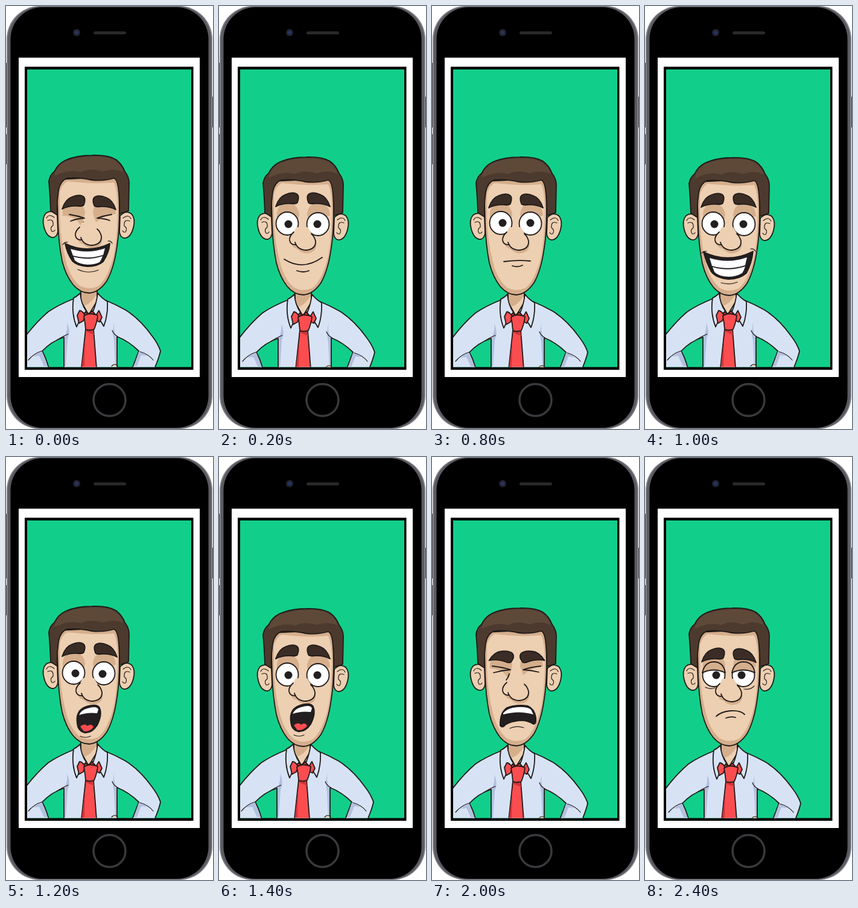
An HTML page for the animation above (2.6 s loop, 343 by 700 pixels).

```html
<!DOCTYPE html>
<html lang="en">
<head>
<meta charset="utf-8">
<title>Changing moods</title>
<style>
html, body { margin: 0; width: 100%; height: 100%; overflow: hidden; background: #fff; }
svg { display: block; width: 343px; height: 700px; }
.ink { stroke: #1f1a18; stroke-width: 1.8; stroke-linejoin: round; stroke-linecap: round; }
.line { fill: none; }
.thin { stroke-width: 1.2; }
.skin { fill: #edcfb1; }
.shade { fill: #d5ae8c; }
.shirt { fill: #d7e3f5; }
.fold { fill: #b3c0df; }
.red { fill: #fb4d50; }
.dark { fill: #cf3539; }
.hair { fill: #4d3a2e; }
.brow { fill: #3b2d26; }
.hole { fill: #231f20; }
.white { fill: #fff; }
</style>
</head>
<body>
<svg viewBox="0 0 343 700">
  <defs>
    <clipPath id="screen"><path d="M35 105H307V597.500H35Z"/></clipPath>

    <g id="body">
      <path class="ink shirt" d="M115 486Q88 497 72 508Q53 524 33 550V602H73Q69 586 62 573Q77 557 98 550V602H186V549Q206 557 222 573Q217 586 211 602H248Q255 586 258 573Q254 561 244 548Q224 520 200 505Q184 496 167 489Z"/>
      <path class="fold" d="M47 582Q54 576 62 574L71 598H65L57 581ZM236 581Q230 576 222 574L214 598H219L226 580ZM99 551Q105 535 103 525Q110 540 104 553L101 598H99ZM185 550Q179 538 182 523Q177 540 181 556L183 598H185Z"/>
      <path class="ink line thin" d="M39 588Q48 577 61 573M224 574Q238 578 246 588M86 555Q97 548 105 545M187 549Q180 545 178 539"/>
      <path class="ink skin thin" d="M177 598Q182 592 187 598"/>
      <path class="ink skin" d="M126 470V490L139 513L153 490V470Z"/>
      <path class="shade" d="M127 472V489L132 498Q143 494 152 480V472Z"/>
      <path class="ink dark" d="M124 505L119 516L124 526L134 518L139 512L152 519L161 524L160 511L153 501L139 511Z"/>
      <path class="ink shirt" d="M125 477Q119 483 114 485Q110 511 119 533Q124 521 130 512L135 507Q126 494 125 477ZM154 477Q161 486 170 491Q171 514 164 532Q157 519 146 508Q152 494 154 477Z"/>
      <path class="ink red" d="M120 514L124 506Q130 507 133 515L130 523L123 527ZM151 514L156 506L161 517L157 525L151 522Z"/>
      <path class="ink red" d="M134 536L127 601H152L147 536Z"/>
      <path class="dark" d="M135 537H146L148 546L135 541ZM128 594L133 555L132 598H128Z"/>
      <path class="ink red" d="M131 515Q140 508 154 514Q153 525 148 537Q140 540 134 537Q133 525 131 515Z"/>
    </g>

    <g id="ear">
      <path class="ink skin" d="M88 349Q78 339 69 346Q62 354 66 369Q71 387 82 386Q88 384 89 376Z"/>
      <path class="ink line thin" d="M83 353Q74 346 70 354M72 358Q82 354 81 366Q75 370 79 376Q82 377 84 374"/>
    </g>

    <g id="head">
      <use href="#ear" x="-1"/>
      <use href="#ear" transform="matrix(-1 0 0 1 279 1)"/>
      <path class="ink shade" d="M86 290L88 360Q89 395 95 425Q101 449 113 464Q125 478 140 478Q156 477 169 458Q181 437 186 400Q190 375 190 340L189 285Z"/>
      <path class="skin" d="M91 312Q94 298 104 293Q145 298 181 295Q187 307 187 342Q186 397 178 425Q167 459 154 467Q138 474 123 465Q107 450 101 424Q92 390 91 350Z"/>
      <path class="shade" d="M96 350Q94 328 112 326Q130 325 133 345Q130 361 126 368Q119 350 96 350ZM146 346Q147 326 165 326Q183 327 184 347Q163 349 151 361Z"/>
      <path class="ink hair" d="M76 342Q75 315 73 293Q75 282 82 277Q88 264 101 258Q120 250 145 250Q171 249 184 257Q194 264 199 277Q206 286 206 296L205 342L190 347Q191 324 188 303Q186 290 181 288Q164 293 144 291Q121 286 103 288Q92 292 89 308Q86 328 87 349Z"/>
      <path fill="#5e4939" d="M83 279Q90 264 103 259Q122 252 145 252Q170 251 183 259Q193 266 197 278Q181 270 162 277Q141 270 126 278Q108 272 83 284Z"/>
    </g>

    <path id="brow" class="ink brow" d="M-19 12Q-14 -4 -3 -8Q9 -13 16 -9Q21 -5 17 5Q15 8 8 7Q-8 6 -19 12Z"/>

    <g id="nose">
      <path class="shade" d="M118 390Q122 401 130 402Q139 412 152 408Q163 404 161 390Z"/>
      <path class="skin" d="M128 366L124 374Q116 381 117 388Q119 396 127 396Q131 405 145 404Q161 402 160 389Q158 381 153 376L147 366Z"/>
      <path class="ink line" d="M124 374Q116 381 117 388Q119 396 128 395M126 391Q130 404 145 404Q161 402 160 389Q158 381 153 377"/>
    </g>
  </defs>

  <path fill="#4a494f" d="M0 94H6V201H0ZM0 212H6V262H0ZM337 150H343V201H337Z"/>
  <rect x="1" y="0" width="341" height="700" rx="55" fill="#838289"/>
  <rect x="3" y="1" width="337" height="698" rx="54" fill="#5b5a61"/>
  <rect x="7.500" y="2" width="328" height="696" rx="53"/>
  <circle cx="117" cy="44" r="6" fill="#22232c"/>
  <circle cx="117" cy="44" r="3" fill="#253467"/>
  <rect x="145" y="42" width="54" height="5" rx="2.500" fill="#29282b"/>
  <circle cx="171.500" cy="652" r="26.500" stroke="#3a393d" stroke-width="3.500"/>
  <path fill="#fff" d="M21 85.500H321V614H21Z"/>
  <path d="M31 100.500H310.500V602H31Z"/>
  <path fill="#11cf8a" d="M35 105H307V597.500H35Z"/>
  <g id="man" clip-path="url(#screen)"></g>
</svg>
<script>
const STEP = 200;
const path = (cls, d) => `<path class="${cls}" d="${d}"/>`;
const use = (id, x, y) => `<use href="#${id}" x="${x}" y="${y}"/>`;
const line = (d, thin = '') => path('ink line ' + thin, d);

function brows(lx, ly, rx, ry, tilt = 0, tiltR = tilt) {
  return `<use href="#brow" transform="translate(${lx} ${ly}) rotate(${tilt})"/>` +
    `<use href="#brow" transform="translate(${rx} ${ry}) scale(-1 1) rotate(${tiltR})"/>`;
}

function eye(x, y, px, py) {
  return `<ellipse class="ink white" cx="${x}" cy="${y}" rx="18.5" ry="19"/>
    <circle class="hole" cx="${px}" cy="${py}" r="6.5"/>`;
}
const eyes = (l, r) => eye(...l) + eye(...r);

function lids(x, y) {
  return path('ink shade', `M${x - 19} ${y}Q${x - 15} ${y - 18} ${x} ${y - 18}Q${x + 16} ${y - 18} ${x + 19} ${y}Q${x} ${y - 9} ${x - 19} ${y}Z`);
}

// Squeezed-shut eyes with the bridge of the nose
const shut = (y, w) =>
  line(`M${105 - w} ${y - 6}Q118 ${y - 4} 130 ${y}Q116 ${y + 1} ${107 - w} ${y + 5}`) +
  line(`M${175 + w} ${y - 6}Q162 ${y - 4} 151 ${y}Q165 ${y + 1} ${172 + w} ${y + 4}`) +
  line(`M128 ${y + 7}q-1 5 -5 10`);

const wide = eyes([113, 360, 115, 361], [164, 361, 163, 361]);
const glare = eyes([115, 357, 118, 357], [166, 357, 166, 356]);
const tired = eyes([114, 361, 118, 361], [163, 361, 160, 361]) +
  lids(114, 357) + lids(163, 357) +
  line('M100 381Q108 385 116 382M164 384Q174 386 181 379', 'thin');
const scowl = brows(117, 328, 165, 328, 17);
const droop = brows(113, 327, 165, 328);

const gasp = (x, y) => `<g transform="translate(${x} ${y})">` +
  path('ink hole', 'M118 441Q115 421 130 414Q151 407 155 415Q160 426 151 444Q142 458 129 456Q119 453 118 441Z') +
  path('white', 'M121 427Q124 419 135 416Q151 411 153 418L151 424Q135 422 121 427Z') +
  path('red', 'M123 446Q130 440 135 445Q142 440 145 447Q139 455 129 454Z') +
  line('M123 462Q132 466 140 462', 'thin') + '</g>';

const laugh =
  path('ink hole', 'M98 393Q135 411 172 393Q171 408 161 423Q152 431 135 431Q118 430 110 422Q101 409 98 393Z') +
  path('white', 'M107 402Q135 411 164 401L161 412Q135 420 111 413ZM112 415Q135 422 160 414Q158 420 155 424Q147 428 135 428Q121 427 114 421Z') +
  line('M119 436Q137 444 153 437M94 395Q97 390 102 391M169 389Q174 388 176 393', 'thin');

const grin =
  path('ink hole', 'M97 407Q138 427 179 406Q177 426 168 442Q157 452 139 452Q119 451 110 440Q102 426 97 407Z') +
  path('white', 'M107 417Q138 427 169 416L166 429Q138 438 111 430ZM112 432Q138 440 166 431Q164 438 161 442Q151 448 138 448Q121 447 115 440Z') +
  line('M94 409Q97 405 102 406M175 402Q181 401 183 406M126 458Q140 462 153 457', 'thin');

const roar =
  path('ink hole', 'M113 444Q112 424 124 415Q140 409 159 412Q170 417 172 431Q173 443 168 442Q156 434 139 437Q124 439 119 446Q115 448 113 444Z') +
  path('white', 'M118 424Q125 415 141 414Q158 413 164 418L168 426Q144 419 118 426Z') +
  line('M129 449Q140 444 152 448', 'thin');

const worry = line('M119 425Q132 418 145 416Q158 415 163 420M135 426Q143 431 149 426');
const frown = line('M118 429Q127 421 142 420Q158 419 165 426M134 432Q142 429 150 431');
const smile = line('M108 419Q139 439 171 416M129 438Q140 442 149 438');
const flat = line('M119 423Q141 420 163 422M133 430Q142 433 150 429');

const far = [-2, -3, -2, -2], near = [0, 0, 0, 0], mixed = [0, 1, -2, -2];
// Pose (head x, y, body x, y), brows, eyes, mouth, nose offset
const moods = [
  [far, brows(112, 324, 163, 325), shut(351, 0), laugh, -2, -8],
  [near, brows(113, 320, 165, 320), wide, smile, 0, 0],
  [near, brows(114, 326, 166, 316, 8, 0), eyes([115, 358, 121, 358], [161, 360, 168, 359]), flat, 0, 0],
  [near, brows(114, 326, 166, 315, 8, 0), eyes([114, 359, 120, 353], [161, 360, 167, 351]), worry, 0, 0],
  [near, brows(113, 322, 165, 322), eyes([114, 359, 117, 359], [163, 360, 163, 359]), flat, 0, 0],
  [mixed, brows(112, 321, 165, 321), wide, grin, -1, 0],
  [far, brows(112, 318, 165, 319), eyes([112, 357, 115, 358], [162, 358, 160, 359]), gasp(0, 0), -1, 0],
  [mixed, brows(113, 322, 165, 322), wide, gasp(1, -2), -1, 0],
  [near, scowl, glare, gasp(2, -4), 0, 0],
  [near, scowl, glare, frown, 0, 0],
  [near, brows(116, 330, 165, 330, 15), shut(352, 5), roar, 0, -1],
  [near, droop, shut(357, 3), frown, 0, 0],
  [near, droop, tired, frown, 0, 1]
];

const man = document.getElementById('man');
let shown = -1;

function draw(now) {
  const i = Math.floor(now / STEP) % moods.length;
  if (i !== shown) {
    const [[hx, hy, bx, by], brow, look, mouth, nx, ny] = moods[shown = i];
    man.innerHTML = use('body', bx, by) + use('head', hx, hy) +
      look + use('nose', nx, ny) + brow + mouth;
  }
  requestAnimationFrame(draw);
}
draw(0);
</script>
</body>
</html>
```
